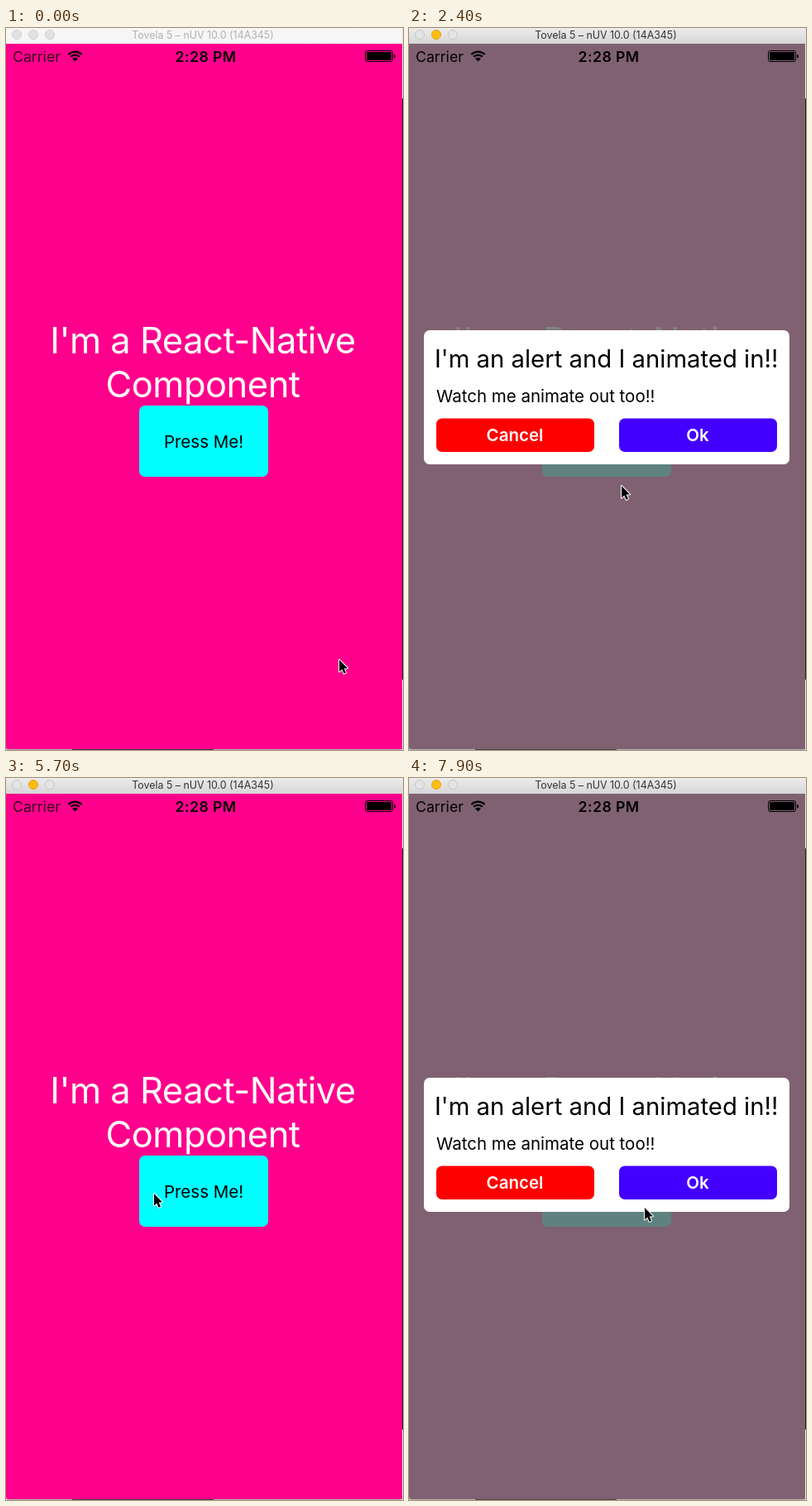
An HTML page with a canvas that plays this animation: 480 by 872 pixels, repeating every 8 s.

```html
<!DOCTYPE html>
<html lang="en">
<head>
<meta charset="utf-8">
<title>Alert demo</title>
<style>
  html, body { margin: 0; width: 100%; height: 100%; overflow: hidden; background: #fff; }
  canvas { display: block; width: 480px; height: 872px; }
</style>
</head>
<body>
<canvas id="stage" width="480" height="872"></canvas>
<script>
const ctx = document.getElementById('stage').getContext('2d');
const LOOP = 8000, STEP = 100;
const PINK = '#ff008c';
const FOCUS = 1600;             // the window becomes active
const OPENS = [2035, 7450];     // the alert starts to rise
const PRESS = 5300, CLOSE = 5430;

// time, x, y of the pointer tip
const PATH = [
  [0, 403, 763], [50, 403, 763], [600, 333, 371], [750, 333, 371],
  [1200, 226, 468], [1400, 241, 502], [1900, 241, 502], [2400, 257, 553],
  [3000, 257, 553], [3300, 244, 637], [3650, 244, 639], [4300, 202, 558],
  [4500, 192, 532], [5200, 179, 502], [5700, 179, 502], [6300, 232, 500],
  [6450, 255, 543], [6600, 285, 519], [8000, 285, 519]
];

const clamp = v => Math.max(0, Math.min(1, v));
const ramp = (t, a, b) => clamp((t - a) / (b - a));
const smooth = p => p * p * (3 - 2 * p);

function pointerAt(t) {
  const i = PATH.findIndex(k => k[0] > t);
  const [t0, x0, y0] = PATH[i - 1], [t1, x1, y1] = PATH[i];
  const p = smooth(ramp(t, t0, t1));
  return [x0 + (x1 - x0) * p, y0 + (y1 - y0) * p];
}

// damped spring from 1 to 0 with a slight overshoot
function spring(ms) {
  if (ms <= 0) return 1;
  const s = ms / 1000, w = 6.98, k = 1.76;
  return Math.exp(-k * w * s) * (Math.cos(w * s) + k * Math.sin(w * s));
}

function alertAt(t) {
  const start = t >= OPENS[1] - 200 ? OPENS[1] : OPENS[0];
  let dim = ramp(t, start - 180, start - 50);
  let drop = 510 * spring(t - start);
  if (start === OPENS[0] && t > CLOSE) {
    const p = ramp(t, CLOSE, CLOSE + 210);
    drop = 510 * p * p;
    dim = 1 - ramp(t, CLOSE + 60, CLOSE + 250);
  }
  return { dim, drop };
}

function box(x, y, w, h, r, fill) {
  ctx.beginPath();
  ctx.roundRect(x, y, w, h, r);
  ctx.fillStyle = fill;
  ctx.fill();
}

function disc(x, y, r, fill, line) {
  ctx.beginPath();
  ctx.arc(x, y, r, 0, Math.PI * 2);
  ctx.fillStyle = fill;
  ctx.fill();
  ctx.strokeStyle = line;
  ctx.lineWidth = 1;
  ctx.stroke();
}

function text(str, x, y, size, fill, { weight = 400, align = 'center', gap = 0 } = {}) {
  ctx.font = `${weight} ${size}px Inter, Roboto, sans-serif`;
  ctx.letterSpacing = gap + 'px';
  ctx.textAlign = align;
  ctx.fillStyle = fill;
  ctx.fillText(str, x, y);
}

function drawTitleBar(active) {
  const g = ctx.createLinearGradient(0, 0, 0, 19);
  g.addColorStop(0, active ? '#ececec' : '#f7f7f7');
  g.addColorStop(1, active ? '#d6d6d6' : '#f5f5f5');
  ctx.fillStyle = g;
  ctx.fillRect(0, 0, 480, 19);
  const idle = active ? '#e4e4e4' : '#e2e2e2', line = active ? '#c6c6c6' : '#d2d2d2';
  disc(13, 8, 5.5, idle, line);
  disc(33, 8, 5.5, active ? '#fdbd0e' : idle, active ? '#e0a21a' : line);
  disc(53, 8, 5.5, idle, line);
  text('Tovela 5 – nUV 10.0 (14A345)', 238, 13, 12.4, active ? '#333' : '#b2b2b2');
}

function drawPage() {
  ctx.fillStyle = PINK;
  ctx.fillRect(0, 19, 480, 853);
  text("I'm a React-Native", 238, 393, 43.5, '#fff', { gap: -0.5 });
  text('Component', 238, 446, 43.5, '#fff', { gap: -0.5 });
  box(161, 456, 156, 86, 7, '#0ff');
  text('Press Me!', 239, 507, 20.5, '#000');
}

function drawStatus(dim) {
  const ink = `rgba(0,0,0,${0.8 + 0.2 * dim})`;
  text('Carrier', 8, 41, 17.7, ink, { align: 'left' });
  text('2:28 PM', 241.5, 41, 17.7, '#000', { weight: 600, gap: 0.4 });
  ctx.strokeStyle = '#000';
  ctx.lineWidth = 2.3;
  for (const r of [11.4, 7.4]) {
    ctx.beginPath();
    ctx.arc(83.5, 40, r, -Math.PI * 0.75, -Math.PI * 0.25);
    ctx.stroke();
  }
  ctx.beginPath();
  ctx.moveTo(83.5, 40.5);
  ctx.arc(83.5, 40.5, 4.8, -Math.PI * 0.75, -Math.PI * 0.25);
  ctx.fillStyle = '#000';
  ctx.fill();
  ctx.beginPath();
  ctx.roundRect(434.5, 27.5, 33, 13, 2.5);
  ctx.lineWidth = 1;
  ctx.stroke();
  box(436, 29, 30, 10, 1, '#000');
  box(469, 32, 2, 4.5, [0, 2, 2, 0], '#000');
}

function drawAlert(drop, pressed) {
  ctx.save();
  ctx.beginPath();
  ctx.rect(0, 19, 480, 853);
  ctx.clip();
  ctx.translate(0, Math.round(364 + drop));
  box(18, 0, 442, 162, 7, '#fff');
  text("I'm an alert and I animated in!!", 31, 45, 29.3, '#000', { align: 'left' });
  text('Watch me animate out too!!', 33, 87, 20.5, '#000', { align: 'left' });
  ctx.globalAlpha = pressed ? 0.5 : 1;
  box(33, 106.5, 191, 40.5, 7, '#f00');
  text('Cancel', 128, 134, 20.5, '#fff', { weight: 600 });
  ctx.globalAlpha = 1;
  box(254, 106.5, 191, 40.5, 7, '#40f');
  text('Ok', 349, 134, 20.5, '#fff', { weight: 600 });
  ctx.restore();
}

function drawEdges() {
  ctx.fillStyle = '#e4e4e4';
  ctx.fillRect(479, 0, 1, 872);
  ctx.fillStyle = '#222';
  ctx.fillRect(479, 85, 1, 702);
  ctx.fillStyle = '#b5b5b5';
  ctx.fillRect(0, 871, 480, 1);
  ctx.fillStyle = '#444';
  ctx.fillRect(80, 871, 171, 1);
  // rounded lower corners
  ctx.fillStyle = '#e4e4e4';
  for (const [x, d] of [[0, 1], [480, -1]]) {
    ctx.beginPath();
    ctx.moveTo(x, 868);
    ctx.quadraticCurveTo(x, 872, x + 4 * d, 872);
    ctx.lineTo(x, 872);
    ctx.fill();
  }
}

function drawPointer(x, y) {
  ctx.save();
  ctx.translate(Math.round(x), Math.round(y));
  ctx.beginPath();
  ctx.moveTo(0, 0);
  ctx.lineTo(0, 14.5);
  ctx.lineTo(3.3, 11.4);
  ctx.lineTo(5.6, 16.8);
  ctx.lineTo(8, 15.7);
  ctx.lineTo(5.7, 10.5);
  ctx.lineTo(10, 10.2);
  ctx.closePath();
  ctx.strokeStyle = '#fff';
  ctx.lineWidth = 2;
  ctx.lineJoin = 'round';
  ctx.stroke();
  ctx.fillStyle = '#000';
  ctx.fill();
  ctx.restore();
}

function draw(t) {
  const { dim, drop } = alertAt(t);
  drawPage();
  if (dim > 0) {
    ctx.fillStyle = `rgba(110,112,110,${0.87 * dim})`;
    ctx.fillRect(0, 19, 480, 853);
  }
  if (drop < 508) drawAlert(drop, t >= PRESS && t < CLOSE);
  drawStatus(dim);
  drawTitleBar(t >= FOCUS);
  drawEdges();
  drawPointer(...pointerAt(t));
}

const begin = performance.now();
function tick() {
  const t = (performance.now() - begin) % LOOP;
  draw(Math.floor(t / STEP) * STEP);
  requestAnimationFrame(tick);
}
tick();
</script>
</body>
</html>
```
